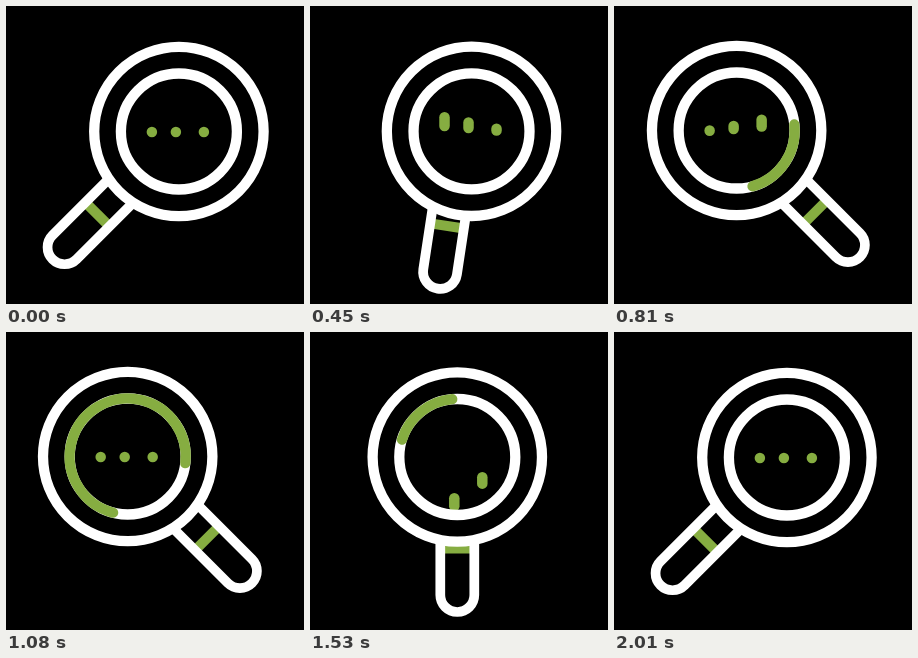
These frames come from a looping animation (298 by 298 pixels, 2.25 s). An HTML page with a canvas:

```html
<!DOCTYPE html>
<html lang="en">
<head>
<meta charset="utf-8">
<title>Searching</title>
<style>
  html, body { margin: 0; width: 100%; height: 100%; overflow: hidden; background: #000; }
  canvas { display: block; width: 100vw; height: 100vh; }
</style>
</head>
<body>
<canvas id="stage" width="298" height="298"></canvas>
<script>
const ctx = document.getElementById('stage').getContext('2d');
const LOOP = 2250, STEP = 30, TAU = Math.PI * 2, RAD = Math.PI / 180;
const GREEN = '#86ad41', WHITE = '#fff';
const OUTER = 84.7, INNER = 58;

const part = (t, start, length) => Math.min(1, Math.max(0, (t - start) / length));
const sine = x => (1 - Math.cos(Math.PI * x)) / 2;

// Ease from 0 to 1 that reaches one half at mid
const swing = (t, start, mid, end) => t < mid
  ? sine(part(t, start, mid - start) / 2)
  : sine(0.5 + part(t, mid, end - mid) / 2);

function stroke(color, width, cap = 'butt') {
  ctx.strokeStyle = color;
  ctx.lineWidth = width;
  ctx.lineCap = cap;
  ctx.stroke();
}

function ring(radius, color, from = 0, to = TAU, cap = 'butt') {
  ctx.beginPath();
  ctx.arc(0, 0, radius, from, to);
  stroke(color, 10.3, cap);
}

function drawHandle(t) {
  const turn = swing(t, 250, 478, 725) - swing(t, 1260, 1530, 1870);
  const angle = 45 - 90 * turn;
  const pull = t < 1000 ? 10 : 13.5;
  const reach = 125.5 - 3 * turn - pull * (1 - (angle / 45) ** 2);
  ctx.save();
  ctx.translate(147.3, 152.5);
  ctx.rotate(angle * RAD);
  ctx.translate(0, reach);
  ctx.beginPath();
  ctx.moveTo(-17, -46.5);
  ctx.lineTo(17, -46.5);
  stroke(GREEN, 10);
  ctx.beginPath();
  ctx.moveTo(17, -100);
  ctx.lineTo(17, 0);
  ctx.arc(0, 0, 17, 0, Math.PI);
  ctx.lineTo(-17, -100);
  stroke(WHITE, 9.7);
  ctx.restore();
}

function drawDot(t, i) {
  const hop = sine(2 * part(t, 170 + 90 * i, 680));
  const fall = Math.max(0, t - 1205 - 72 * i);
  const back = part(t, 1630 + 60 * i, 240);
  let y = 0.5 - 11 * hop, height = 10.5 + 9.5 * hop;
  if (back > 0) {
    const left = (1 - back) ** 2;
    y -= 65 * left;
    height += 8 * left;
  } else {
    const drop = 0.0007 * fall * fall;
    y += drop;
    height += Math.min(8, 0.28 * drop);
  }
  ctx.beginPath();
  ctx.roundRect([-27, -3, 25][i] - 5.25, y - height / 2, 10.5, height, 5.25);
  ctx.fillStyle = GREEN;
  ctx.fill();
}

function drawArc(t) {
  const x = part(t, 565, 1010);
  const tail = -38 + 60 * x + 603 * x ** 2.5;
  const head = -38 + 663 * sine(part(t, 568, 897));
  ring(INNER, GREEN, tail * RAD, Math.max(head, tail + 0.1) * RAD, 'round');
}

function drawLens(t) {
  const shift = swing(t, 250, 570, 860) - swing(t, 1260, 1530, 1840);
  ctx.save();
  ctx.translate(172.9 - 51.2 * shift, 125.5 - shift);
  ctx.beginPath();
  ctx.arc(0, 0, OUTER, 0, TAU);
  ctx.fillStyle = '#000';
  ctx.fill();

  ctx.save();
  ctx.beginPath();
  ctx.arc(0, 0, INNER, 0, TAU);
  ctx.clip();
  for (let i = 0; i < 3; i++) drawDot(t, i);
  ctx.restore();

  ring(OUTER, WHITE);
  ring(INNER, WHITE);
  if (t > 565 && t < 1575) drawArc(t);
  ctx.restore();
}

function frame() {
  const now = performance.now() % LOOP;
  const t = now - now % STEP;
  ctx.fillStyle = '#000';
  ctx.fillRect(0, 0, 298, 298);
  drawHandle(t);
  drawLens(t);
  requestAnimationFrame(frame);
}
frame();
</script>
</body>
</html>
```
